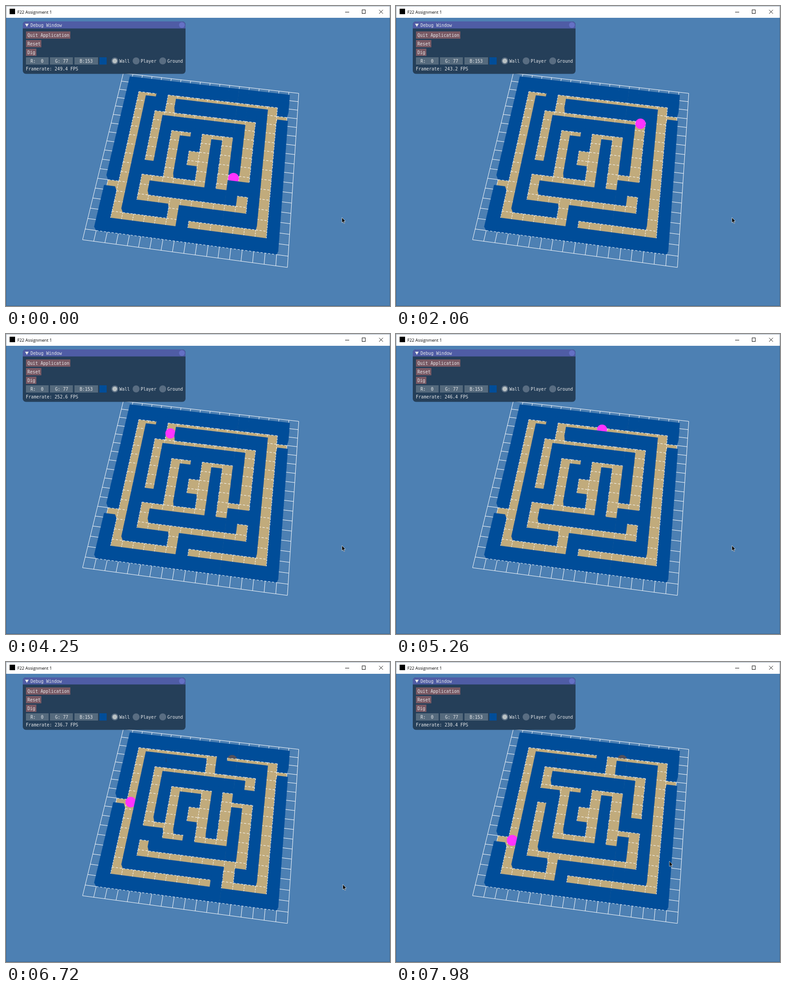
An HTML page with a canvas that plays this animation: 847x661 px, repeating every 8 s.

```html
<!DOCTYPE html>
<html lang="en">
<head>
<meta charset="utf-8">
<title>Maze</title>
<style>
html, body { margin: 0; width: 100%; height: 100%; overflow: hidden; background: #4d80b3; }
canvas { display: block; }
</style>
</head>
<body>
<canvas id="stage" width="847" height="661"></canvas>
<script>
const ctx = document.getElementById('stage').getContext('2d');
const LOOP = 8000, DIM = 16;
const MONO = '9.6px "DejaVu Sans Mono", monospace';
const SANS = '9.3px "Open Sans", sans-serif';
const WALL = '#004d99', FLOOR = '#c1ab7c', PLAYER = '#ff33ff', SKY = '#4d80b3';

const mazeA = `
################
#..#...........#
#.##.#########..
#.#..........#.#
#.#.########.#.#
#.#.#..#...#.#.#
#.#.#.##.#.#.#.#
#.#.#.#..#.#.#.#
#.#.#.#..#.#.#.#
#.###.##.#...#.#
#.#......#.###.#
..#.########.#.#
#.#..........#.#
#.####.#######.#
#......#.......#
################`.trim().split('\n');

const mazeB = `
################
#........#.....#
#.######.#####..
#.#..........#.#
#.#.########.#.#
#.#.#....#.###.#
#.#.#.##.#...#.#
..#.#.#..#.#.#.#
#.#.#.#..#.#.#.#
#.#...##.#.#.#.#
#.###..#...#.#.#
#.#.########.#.#
#.#..........#.#
#.#########.##.#
#.........#....#
################`.trim().split('\n');

const mazeC = `
################
#.......#......#
#.#######.####.#
#.#..........#..
#.#.########.#.#
#.#....#...#.#.#
#.###.##.#.#.#.#
#.#.#.#..#.#.#.#
#.#.#.#..#.###.#
#.#.#.##.#...#.#
#.#.#....#.#.#.#
..#.########.#.#
#.#..........#.#
#.###.########.#
#.....#........#
################`.trim().split('\n');

// Each dig swaps the maze and puts the player beside its entrance
const digs = [
  { t: 5850, maze: mazeC, row: 11 },
  { t: 6400, maze: mazeB, row: 7 },
  { t: 7850, maze: mazeC, row: 11 }
];
const steps = 'RUUUUUULLLLLLLLUURRRRRR';
const stepTimes = [350, 650, 900, 1130, 1380, 1560, 1740,
  2150, 2370, 2570, 2860, 3010, 3180, 3340, 3500,
  3950, 4360, 4680, 4820, 4960, 5120, 5300, 5430];
const fpsKeys = [[0, 249.4], [1190, 241.5], [2920, 238.2], [4250, 252.6], [5260, 246.4],
  [5850, 243], [5980, 197.8], [6180, 229], [6400, 234], [6480, 198.6], [6720, 236.7],
  [7850, 238], [7915, 198.9], [7980, 230.4], [8000, 230.4]];
const cursorKeys = [[0, 741, 466], [5900, 741, 466], [6130, 743, 490], [7450, 743, 490],
  [7715, 667, 474], [7960, 603, 439], [8000, 603, 439]];

// Camera: 30 degree lens above the board, board turned 7.9 degrees
const TURN = 7.9 * Math.PI / 180, COS = Math.cos(TURN), SIN = Math.sin(TURN);
const DIST = 50.6, FOCAL = 1183, TILT_S = 0.8944, TILT_C = 0.4472, EYE_COL = 11;
const MID_X = 423.5, MID_Y = 342.8;

function project(c, r, h = 0) {
  const u = c - DIM / 2, v = r - DIM / 2;
  const x = u * COS - v * SIN, z = u * SIN + v * COS;
  const k = FOCAL / (DIST - h * TILT_S - z * TILT_C);
  return [MID_X + k * x, MID_Y - k * (h * TILT_C - z * TILT_S), k];
}

function poly(points, color) {
  ctx.fillStyle = color;
  ctx.beginPath();
  for (const p of points) ctx.lineTo(p[0], p[1]);
  ctx.closePath();
  ctx.fill();
}

function line(a, b, dash = []) {
  ctx.setLineDash(dash);
  ctx.beginPath();
  ctx.moveTo(a[0], a[1]);
  ctx.lineTo(b[0], b[1]);
  ctx.stroke();
  ctx.setLineDash([]);
}

function pen(color, width = 1) {
  ctx.strokeStyle = color;
  ctx.lineWidth = width;
}

function disc(x, y, r, color) {
  ctx.fillStyle = color;
  ctx.beginPath();
  ctx.arc(x, y, r, 0, 7);
  ctx.fill();
}

function rect(x, y, w, h, color) {
  ctx.fillStyle = color;
  ctx.fillRect(x, y, w, h);
}

function text(str, x, y, font = MONO, color = '#e6e8ea') {
  ctx.font = font;
  ctx.fillStyle = color;
  ctx.fillText(str, x, y);
}

function segment(keys, t) {
  let i = 0;
  while (i < keys.length - 2 && t >= keys[i + 1][0]) i++;
  return [keys[i], keys[i + 1]];
}

function stateAt(t) {
  const dig = digs.filter(d => t >= d.t).pop();
  if (dig) return { maze: dig.maze, col: 1, row: dig.row, dug: true };
  let col = 11, row = 9;
  stepTimes.forEach((at, i) => {
    if (t < at) return;
    if (steps[i] === 'U') row--;
    else col += steps[i] === 'R' ? 1 : -1;
  });
  return { maze: mazeA, col, row, dug: false };
}

function fpsAt(t) {
  const [a, b] = segment(fpsKeys, t);
  const n = Math.floor((t - a[0]) / 65);
  const f = n * 65 / (b[0] - a[0]);
  const noise = n ? 4 * Math.sin(n * 2.3 + a[0]) * Math.sin(f * Math.PI) : 0;
  return (a[1] + (b[1] - a[1]) * f + noise).toFixed(1);
}

function drawGrid() {
  pen('#fff');
  for (let i = -1; i <= DIM + 1; i++) {
    line(project(i, -1), project(i, DIM + 1));
    if (i !== DIM) line(project(-1, i), project(DIM + 1, i));
  }
  line(project(-1, DIM), project(0, DIM));
  line(project(DIM, DIM), project(DIM + 1, DIM));
  const end = DIM - 0.1;
  poly([project(0, 0), project(DIM, 0), project(DIM, end), project(0, end)], FLOOR);
}

function drawWall(c, r) {
  const near = c < EYE_COL ? c + 1 : c, far = c < EYE_COL ? c : c + 1;
  poly([project(far, r, 1), project(near, r, 1), project(near, r),
    project(near, r + 1), project(far, r + 1), project(far, r + 1, 1)], WALL);
  // A hairline closes the seams between neighbours
  pen(WALL, 0.5);
  ctx.stroke();
}

function drawFloor(c, r) {
  pen('#fff');
  line(project(c, r), project(c + 1, r), [5, 3.5]);
  if (c <= EYE_COL) line(project(c, r), project(c, r + 1), [4, 2]);
  if (c >= EYE_COL) line(project(c + 1, r), project(c + 1, r + 1), [4, 2]);
}

// Cells go back to front, and from both sides towards the eye
const colOrder = [...Array(DIM).keys()].sort((a, b) => Math.abs(b - EYE_COL) - Math.abs(a - EYE_COL));

function drawMaze({ maze, col, row, dug }) {
  drawGrid();
  for (let r = 0; r < DIM; r++) {
    for (const c of colOrder) {
      if (maze[r][c] === '#') drawWall(c, r);
      else drawFloor(c, r);
      if (c === col && r === row) {
        const [x, y, k] = project(c + 0.5, r + 0.5, 0.5);
        disc(x, y, k / 2, PLAYER);
      }
    }
  }
  pen('#fff');
  line(project(0, DIM), project(DIM, DIM), [5, 3.5]);
  if (dug) {
    // Faint trace where the player stood
    ctx.fillStyle = '#52505b';
    ctx.beginPath();
    ctx.arc(498.9, 215.8, 11, Math.PI + 0.4, -0.25);
    ctx.fill();
    rect(352.5, 212, 1.5, 9, '#1b3f70');
  }
}

function button(label, y, w) {
  rect(44, y, w, 16, '#785964');
  text(label, 47.3, y + 11.6);
}

function drawPanel(t) {
  ctx.fillStyle = '#253f59';
  ctx.beginPath();
  ctx.roundRect(37, 34, 359, 115.5, 7);
  ctx.fill();
  ctx.fillStyle = '#4f5ca5';
  ctx.beginPath();
  ctx.roundRect(37, 34, 359, 15.5, [7, 7, 0, 0]);
  ctx.fill();
  poly([[42, 39], [50, 39], [46, 46]], '#e6e8ea');
  text('Debug Window', 54, 45.5);
  disc(388, 42, 6.3, '#6470c4');

  button('Quit Application', 56, 98);
  button('Reset', 75, 34);
  button('Dig', 94, 23);

  rect(44, 113, 50, 16, '#556a7d');
  rect(97, 113, 50.5, 16, '#556a7d');
  rect(151, 113, 52, 16, '#556a7d');
  rect(206, 113, 16, 16, WALL);
  text('R:  0', 54, 124.8);
  text('G: 77', 108.3, 124.8);
  text('B:153', 162.5, 124.8);

  [['Wall', 240], ['Player', 287], ['Ground', 345.7]].forEach(([label, x]) => {
    disc(x, 121, 7.7, '#596d82');
    text(label, x + 10, 124.8);
  });
  disc(240, 121, 5.2, '#b9c1c4');
  text('Framerate: ' + fpsAt(t) + ' FPS', 43.8, 141.6);
}

function drawFrame() {
  rect(0, 0, 847, 26, '#fff');
  rect(8, 6, 12, 12, '#000');
  text('F22 Assignment 1', 25, 16.5, SANS, '#000');
  pen('#111');
  line([748, 13.5], [757, 13.5]);
  ctx.strokeRect(785.5, 8.5, 7, 8);
  line([823, 8.5], [831.5, 17]);
  line([831.5, 8.5], [823, 17]);
  pen('rgba(40, 70, 100, 0.45)');
  ctx.strokeRect(0.5, 0.5, 846, 660);
}

function drawCursor(t) {
  const [a, b] = segment(cursorKeys, t);
  const f = (t - a[0]) / (b[0] - a[0]);
  ctx.save();
  ctx.translate(a[1] + (b[1] - a[1]) * f, a[2] + (b[2] - a[2]) * f);
  poly([[0, 0], [0, 11.5], [2.5, 9.3], [4.3, 13.2], [6, 12.4], [4.3, 8.6], [7.6, 8.3]], '#000');
  pen('#fff', 0.7);
  ctx.stroke();
  ctx.restore();
}

function draw(now) {
  const t = now % LOOP;
  rect(0, 0, 847, 661, SKY);
  drawMaze(stateAt(t));
  drawPanel(t);
  drawFrame();
  drawCursor(t);
}

const start = performance.now();
function tick() {
  draw(performance.now() - start);
  requestAnimationFrame(tick);
}
tick();
</script>
</body>
</html>
```
